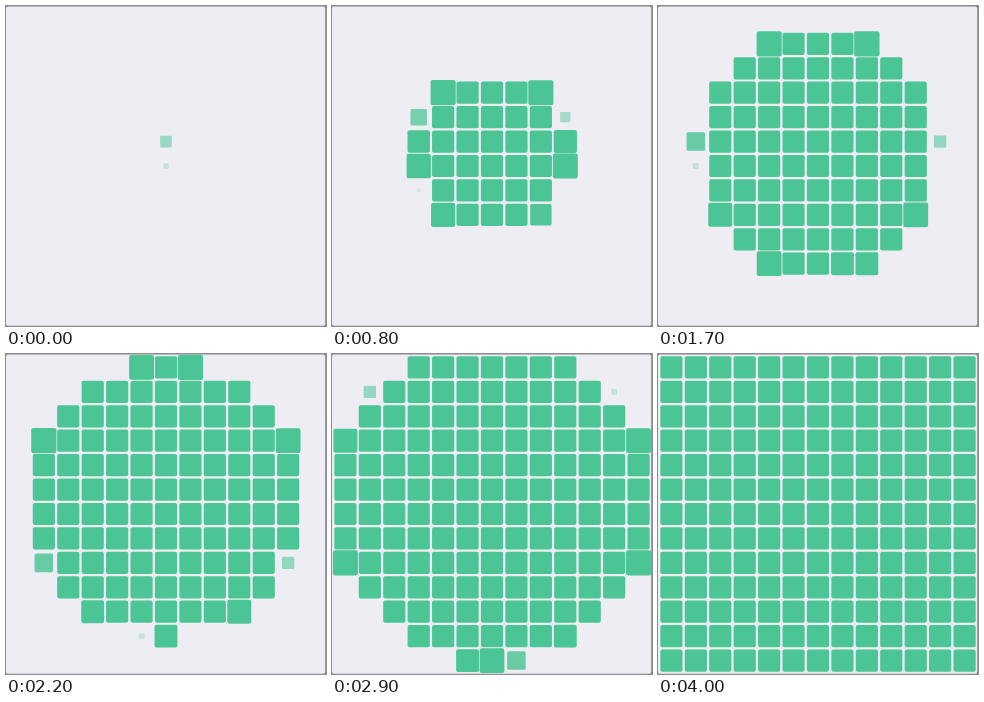
An HTML page with a canvas for the animation above (4100 ms loop, 320 px wide and 320 px high).

```html
<!DOCTYPE html>
<html lang="en">
<head>
<meta charset="utf-8">
<title>Growing tiles</title>
<style>
  html, body { margin: 0; width: 100%; height: 100%; overflow: hidden; background: #efedf4; }
  canvas { display: block; width: 320px; height: 320px; }
</style>
</head>
<body>
<canvas width="320" height="320"></canvas>
<script>
const ctx = document.querySelector('canvas').getContext('2d');
const LOOP = 4100, STEP = 100;
const COUNT = 13, PITCH = 24.43, SIZE = 22.2, RADIUS = 2;
const GREEN = '#4bc596', PAPER = '#efedf4', EDGE = '#85848a';
const LEAD = 1.85; // head start of the first tile, in tiles

// Time in ms -> number of tiles released
const CLOCK = [[0, 0], [500, 23.1], [600, 25.1], [1200, 54.1], [1700, 79.1],
  [2200, 101.1], [2400, 111.1], [2900, 135.1], [4100, 191]];

// Scale of a tile at each whole unit of age: grow, overshoot, settle
const POP = [0, .28, .57, .85, 1.04, 1.12, 1.14, 1.13, 1.12, 1.08, 1.03, 1];

// Tiles sorted outwards from a point just above the centre
const tiles = [];
for (let row = 0; row < COUNT; row++) {
  for (let col = 0; col < COUNT; col++) {
    tiles.push({
      x: 160 + (col - 6) * PITCH,
      y: 160 + (row - 6) * PITCH,
      d: (col - 6) ** 2 + (row - 5.42) ** 2
    });
  }
}
tiles.sort((a, b) => a.d - b.d);

const mix = (a, b, k) => a + (b - a) * k;

function released(t) {
  const i = CLOCK.findIndex(p => p[0] > t);
  const [t0, n0] = CLOCK[i - 1], [t1, n1] = CLOCK[i];
  return mix(n0, n1, (t - t0) / (t1 - t0));
}

function pop(age) {
  const i = Math.floor(age);
  return i >= POP.length - 1 ? 1 : mix(POP[i], POP[i + 1], age - i);
}

function roundRect(x, y, w, h, r) {
  ctx.beginPath();
  ctx.roundRect(x, y, w, h, r);
  ctx.fill();
}

function draw(t) {
  ctx.globalAlpha = 1;
  ctx.fillStyle = EDGE;
  ctx.fillRect(0, 0, 320, 320);
  ctx.fillStyle = PAPER;
  roundRect(0, .4, 319.2, 319.4, 2);

  ctx.fillStyle = GREEN;
  const now = released(t) + LEAD;
  tiles.forEach(({ x, y }, i) => {
    const age = now - i;
    if (age <= 0) return;
    const scale = pop(age), size = SIZE * scale;
    ctx.globalAlpha = Math.min(1, scale);
    roundRect(x - size / 2, y - size / 2, size, size, RADIUS * scale);
  });
}

const start = performance.now();
function tick() {
  const t = (performance.now() - start) % LOOP;
  draw(Math.floor(t / STEP) * STEP);
  requestAnimationFrame(tick);
}
tick();
</script>
</body>
</html>
```
